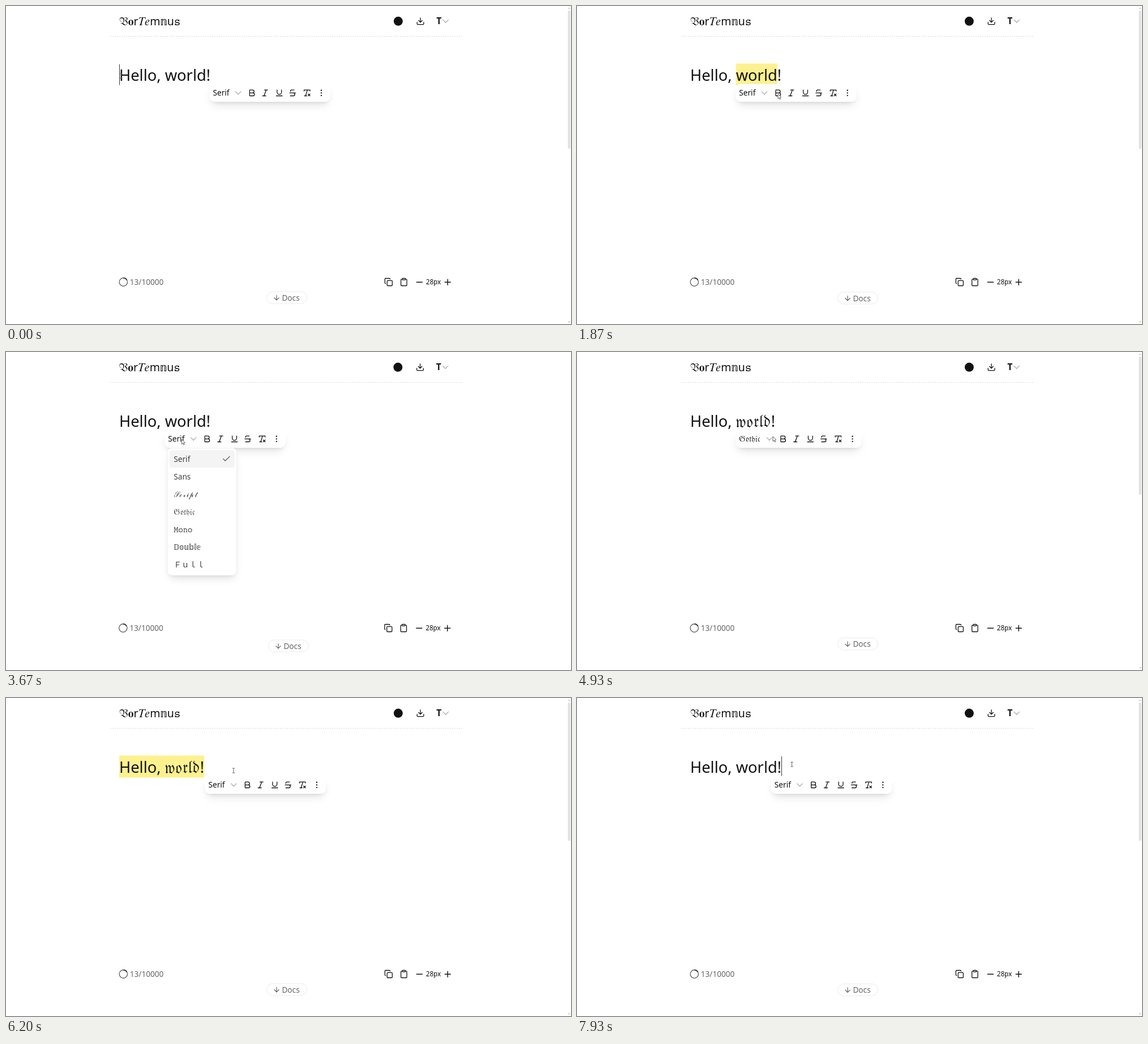
Recreate the animation shown at these times as an HTML page with a canvas. Size 998x561 px, loop 8000 ms.

```html
<!DOCTYPE html>
<html lang="en">
<head>
<meta charset="utf-8">
<title>Text styler</title>
<style>
  html, body { margin: 0; width: 100%; height: 100%; overflow: hidden; background: #fff; }
  canvas { display: block; width: 998px; height: 561px; }
</style>
</head>
<body>
<canvas id="stage" width="998" height="561"></canvas>
<script>
const ctx = document.getElementById('stage').getContext('2d');
const LOOP = 8000;
const SANS = '"Noto Sans", "Noto Sans Math", "DejaVu Sans", "Noto Sans CJK JP", sans-serif';
const SERIF = '"Noto Serif", serif';
const BIG = 27.3, SMALL = 13.65, LEFT = 200;
const INK = '#111', GREY = '#666';
const LOGO = '𝔙𝐨r𝑇𝑒m𝕟u𝚜';

// Track is letter spacing in em
const FACES = {
  serif:      { label: 'Serif', word: 'world' },
  bold:       { label: 'Serif', word: 'world', style: 'bold', family: SERIF },
  boldItalic: { label: 'Serif', word: 'world', style: 'italic bold', family: SERIF },
  sans:       { label: '𝖲𝖺𝗇𝗌' },
  script:     { label: '𝒮𝒸𝓇𝒾𝓅𝓉', track: 0.1 },
  gothic:     { label: '𝔊𝔬𝔱𝔥𝔦𝔠', word: '𝔴𝔬𝔯𝔩𝔡', scale: 1.06, track: 0.05 },
  mono:       { label: '𝙼𝚘𝚗𝚘' },
  double:     { label: '𝔻𝕠𝕦𝕓𝕝𝕖' },
  full:       { label: 'Ｆｕｌｌ' }
};
const MENU = ['serif', 'sans', 'script', 'gothic', 'mono', 'double', 'full'];

const ICONS = {
  bold: 'M6 12h9a4 4 0 0 1 0 8H7a1 1 0 0 1-1-1V5a1 1 0 0 1 1-1h7a4 4 0 0 1 0 8',
  italic: 'M19 4h-9M14 20H5M15 4L9 20',
  underline: 'M6 4v6a6 6 0 0 0 12 0V4M4 20h16',
  strike: 'M16 4H9a3 3 0 0 0-2.83 4M14 12a4 4 0 0 1 0 8H6M4 12h16',
  clear: 'M4 7V4h16v3M5 20h6M13 4L8 20M15 15l5 5M20 15l-5 5',
  more: 'M12 5h.01M12 12h.01M12 19h.01',
  download: 'M21 15v4a2 2 0 0 1-2 2H5a2 2 0 0 1-2-2v-4M7 10l5 5 5-5M12 15V3',
  chevron: 'M6 9l6 6 6-6',
  copy: 'M10 8h10a2 2 0 0 1 2 2v10a2 2 0 0 1-2 2H10a2 2 0 0 1-2-2V10a2 2 0 0 1 2-2zM4 16c-1.1 0-2-.9-2-2V4c0-1.1.9-2 2-2h10c1.1 0 2 .9 2 2',
  paste: 'M9 2h6a1 1 0 0 1 1 1v2a1 1 0 0 1-1 1H9a1 1 0 0 1-1-1V3a1 1 0 0 1 1-1zM16 4h2a2 2 0 0 1 2 2v14a2 2 0 0 1-2 2H6a2 2 0 0 1-2-2V6a2 2 0 0 1 2-2h2',
  minus: 'M5 12h14',
  plus: 'M5 12h14M12 5v14',
  down: 'M12 5v14M19 12l-7 7-7-7',
  check: 'M20 6L9 17l-5-5'
};
for (const k in ICONS) ICONS[k] = new Path2D(ICONS[k]);

// What the user does, and when
const STEPS = [
  [0,    { face: 'serif', label: 'serif', caret: 'start', sel: null, menu: false }],
  [470,  { caret: 'comma' }],
  [1250, { caret: null, sel: 'word' }],
  [1900, { face: 'bold', label: 'bold' }],
  [2330, { face: 'boldItalic', label: 'boldItalic' }],
  [2720, { face: 'bold', label: 'bold' }],
  [2980, { face: 'serif', label: 'serif' }],
  [3530, { sel: null, menu: true }],
  [4330, { face: 'gothic', label: 'gothic', menu: false }],
  [5640, { caret: 'end', label: 'serif' }],
  [6150, { caret: null, sel: 'all' }],
  [7150, { face: 'serif' }],
  [7620, { caret: 'end', sel: null }]
];

// Pointer stops: time, x, y
const STOPS = [
  [0, 203, 123], [100, 203, 123], [420, 272, 122], [520, 272, 122],
  [850, 333, 113], [1270, 333, 113], [1700, 355, 155], [1930, 355, 155],
  [2200, 378, 154], [2740, 378, 154], [2920, 355, 155], [3270, 355, 155],
  [3500, 310.5, 154], [3720, 310.5, 154], [4070, 316, 280], [4350, 316, 280],
  [4850, 346, 149], [5040, 346, 149], [5500, 402, 128], [6350, 402, 128],
  [6900, 372, 154], [7200, 372, 154], [7530, 379.6, 117], [LOOP, 379.6, 117]
];

// Where the toolbar heads: time, x
const ANCHORS = [[0, 200], [470, 272], [1250, 280], [5640, 352], [6200, 200], [7620, 360.5]];

const clamp = v => Math.max(0, Math.min(1, v));
const mix = (a, b, p) => a + (b - a) * p;

function bezier(x1, y1, x2, y2, x) {
  const at = (a, b, s) => 3 * (1 - s) * (1 - s) * s * a + 3 * (1 - s) * s * s * b + s * s * s;
  let lo = 0, hi = 1;
  for (let i = 0; i < 24; i++) {
    const mid = (lo + hi) / 2;
    if (at(x1, x2, mid) < x) lo = mid; else hi = mid;
  }
  return at(y1, y2, lo);
}

function stateAt(t) {
  const s = {};
  for (const [at, change] of STEPS) if (t >= at) Object.assign(s, change);
  return s;
}

function pointerAt(t) {
  const i = Math.max(1, STOPS.findIndex(s => s[0] > t));
  const a = STOPS[i - 1], b = STOPS[i];
  let p = clamp((t - a[0]) / (b[0] - a[0]));
  p = p * p * (3 - 2 * p);
  return [mix(a[1], b[1], p), mix(a[2], b[2], p)];
}

function toolbarAt(t) {
  let x = 360;
  ANCHORS.forEach(([at, to], i) => {
    if (t < at) return;
    const end = Math.min(t, i + 1 < ANCHORS.length ? ANCHORS[i + 1][0] : LOOP);
    x = mix(x, to, 1 - (1 - clamp((end - at) / 600)) ** 3);
  });
  return x;
}

function bounceAt(t) {
  const p = (t / 1000 + 0.86) % 1;
  const drop = p < 0.5 ? bezier(0.8, 0, 1, 1, p * 2) : 1 - bezier(0, 0, 0.2, 1, p * 2 - 1);
  return 514.3 + 5.3 * drop;
}

function setFont(size, { style = '', family = SANS, scale = 1, track = 0 } = {}) {
  ctx.font = `${style} ${size * scale}px ${family}`;
  ctx.letterSpacing = `${size * track}px`;
}
function text(str, x, y, size, color = INK, face) {
  setFont(size, face);
  ctx.fillStyle = color;
  ctx.fillText(str, x, y);
}
function width(str, size, face) {
  setFont(size, face);
  return ctx.measureText(str).width;
}

function icon(name, x, y, color = INK, scale = 0.65, weight = 2) {
  ctx.save();
  ctx.translate(x, y);
  ctx.scale(scale, scale);
  ctx.translate(-12, -12);
  ctx.lineCap = ctx.lineJoin = 'round';
  ctx.lineWidth = weight;
  ctx.strokeStyle = color;
  ctx.stroke(ICONS[name]);
  ctx.restore();
}

function box(x, y, w, h, r, fill) {
  ctx.beginPath();
  ctx.roundRect(x, y, w, h, r);
  if (fill) { ctx.fillStyle = fill; ctx.fill(); }
}

function card(x, y, w, h, r) {
  for (const [drop, blur] of [[9, 15], [4, 6]]) {
    ctx.save();
    ctx.shadowColor = 'rgba(0,0,0,0.1)';
    ctx.shadowBlur = blur;
    ctx.shadowOffsetY = drop;
    box(x + 3, y + 3, w - 6, h - 6, r, '#fff');
    ctx.restore();
  }
  box(x, y, w, h, r, '#fff');
}

function triangle(x, y, d) {
  ctx.fillStyle = '#ccc';
  ctx.beginPath();
  ctx.moveTo(x - 2.5, y - d);
  ctx.lineTo(x + 2.5, y - d);
  ctx.lineTo(x, y + d);
  ctx.fill();
}

function drawHeader() {
  text(LOGO, LEFT, 33.5, 19.5);
  ctx.beginPath();
  ctx.arc(692.8, 26.8, 8, 0, Math.PI * 2);
  ctx.fillStyle = INK;
  ctx.fill();
  icon('download', 732, 26.8);
  text('T', 760.3, 32.2, 15.6, INK, { style: '600' });
  icon('chevron', 776.6, 26.8, '#aaa', 0.8, 1.6);
  ctx.strokeStyle = '#d9d9d9';
  ctx.lineWidth = 1;
  ctx.setLineDash([2, 2]);
  ctx.beginPath();
  ctx.moveTo(184, 53.5);
  ctx.lineTo(808, 53.5);
  ctx.stroke();
  ctx.setLineDash([]);
}

function drawFooter() {
  ctx.lineWidth = 1.4;
  ctx.strokeStyle = GREY;
  ctx.beginPath();
  ctx.arc(207.3, 487, 7.2, 0, Math.PI * 2);
  ctx.stroke();
  ctx.strokeStyle = '#222';
  ctx.beginPath();
  ctx.arc(207.3, 487, 7.2, -Math.PI / 2, -0.5);
  ctx.stroke();
  text('13/10000', 218.7, 492, SMALL, GREY);
  icon('copy', 675.8, 487);
  icon('paste', 702.8, 487);
  icon('minus', 730.3, 487.2, INK, 0.72);
  text('28px', 741.7, 491.4, 11.7);
  icon('plus', 780.2, 487.2, INK, 0.72);
}

function drawDocs(x, y) {
  box(x + 0.5, y - 10.5, 71, 21, 10.5);
  ctx.strokeStyle = '#ebebeb';
  ctx.lineWidth = 1;
  ctx.stroke();
  icon('down', x + 18, y + 0.2, GREY, 0.6);
  text('Docs', x + 27.4, y + 5.2, SMALL, GREY);
}

function drawScrollbar() {
  box(992.5, 8, 4.5, 244, 2, '#e2e2e2');
  triangle(994.7, 4, -1.2);
  triangle(994.7, 557.5, 1.2);
}

function drawEditor(s) {
  const face = FACES[s.face];
  const wordX = LEFT + width('Hello, ', BIG);
  const bangX = wordX + width(face.word, BIG, face);
  const endX = bangX + width('!', BIG);
  ctx.fillStyle = '#fdf18f';
  if (s.sel === 'word') ctx.fillRect(wordX, 101.5, bangX - wordX, 39);
  if (s.sel === 'all') ctx.fillRect(LEFT, 101.5, endX - LEFT, 39);
  text('Hello, ', LEFT, 132, BIG);
  text(face.word, wordX, 132, BIG, INK, face);
  text('!', bangX, 132, BIG);
  if (s.caret) {
    const x = { start: LEFT, comma: LEFT + width('Hello,', BIG), end: endX }[s.caret];
    ctx.fillStyle = '#333';
    ctx.fillRect(Math.round(x), 103, 1, 36.5);
  }
}

function drawToolbar(x, s) {
  const face = FACES[s.label];
  const w = width(face.label, SMALL, face);
  const base = x + w;
  card(x, 137.5, w + 185, 31.5, 9);
  if (s.label === 'boldItalic') box(base + 34.5, 142, 46.5, 23, 5, '#f2f2f2');
  else if (s.label === 'bold') box(base + 34.5, 142, 23, 23, 5, '#f2f2f2');
  text(face.label, x + 6.3, 158.2, SMALL, INK, face);
  icon('chevron', base + 22, 153.3, '#aaa', 0.8, 1.6);
  const tools = ['bold', 'italic', 'underline', 'strike', 'clear', 'more'];
  const offsets = [46, 69.5, 94.5, 118, 143.5, 168.7];
  tools.forEach((n, i) => icon(n, base + offsets[i], 153.3, INK, 0.65, n === 'more' ? 3.6 : 2));
}

function drawMenu(pointerY) {
  card(285, 169.5, 122.5, 224.5, 8);
  ctx.strokeStyle = '#f0f0f0';
  ctx.lineWidth = 1;
  ctx.stroke();
  const hover = Math.max(0, Math.round((pointerY - 188.5) / 31));
  box(289, 173.3 + hover * 31, 115, 31, 5, '#f4f4f4');
  MENU.forEach((n, i) => text(FACES[n].label, 296.3, 193.5 + i * 31, SMALL, '#404040', FACES[n]));
  icon('check', 389.3, 188.6, GREY, 0.7);
}

function drawPointer(x, y) {
  ctx.lineWidth = 1;
  ctx.beginPath();
  // Text beam over the editor, arrow over the controls
  if (y < 137) {
    for (const d of [-1, 1]) {
      ctx.moveTo(x - 2.2, y + 4 * d);
      ctx.lineTo(x + 2.2, y + 4 * d);
    }
    ctx.moveTo(x, y - 4);
    ctx.lineTo(x, y + 4);
    ctx.strokeStyle = GREY;
    ctx.stroke();
    return;
  }
  [[0, 0], [0, 8.5], [2, 6.8], [3.4, 9.8], [4.6, 9.2], [3.3, 6.2], [5.8, 6]]
    .forEach(([dx, dy]) => ctx.lineTo(x + dx, y + dy));
  ctx.closePath();
  ctx.fillStyle = '#fff';
  ctx.fill();
  ctx.strokeStyle = '#555';
  ctx.lineWidth = 0.9;
  ctx.stroke();
}

function draw(t) {
  const s = stateAt(t);
  const [px, py] = pointerAt(t);
  ctx.fillStyle = '#fff';
  ctx.fillRect(0, 0, 998, 561);
  ctx.save();
  // An open menu hides the scrollbar and nudges the page
  if (s.menu) ctx.translate(-0.5, 0);
  drawHeader();
  drawFooter();
  ctx.restore();
  drawDocs(s.menu ? 463 : 460, bounceAt(t));
  if (!s.menu) drawScrollbar();
  drawEditor(s);
  drawToolbar(toolbarAt(t), s);
  if (s.menu) drawMenu(py);
  drawPointer(px, py);
}

const start = performance.now();
function tick() {
  draw((performance.now() - start) % LOOP);
  requestAnimationFrame(tick);
}
tick();
</script>
</body>
</html>
```
